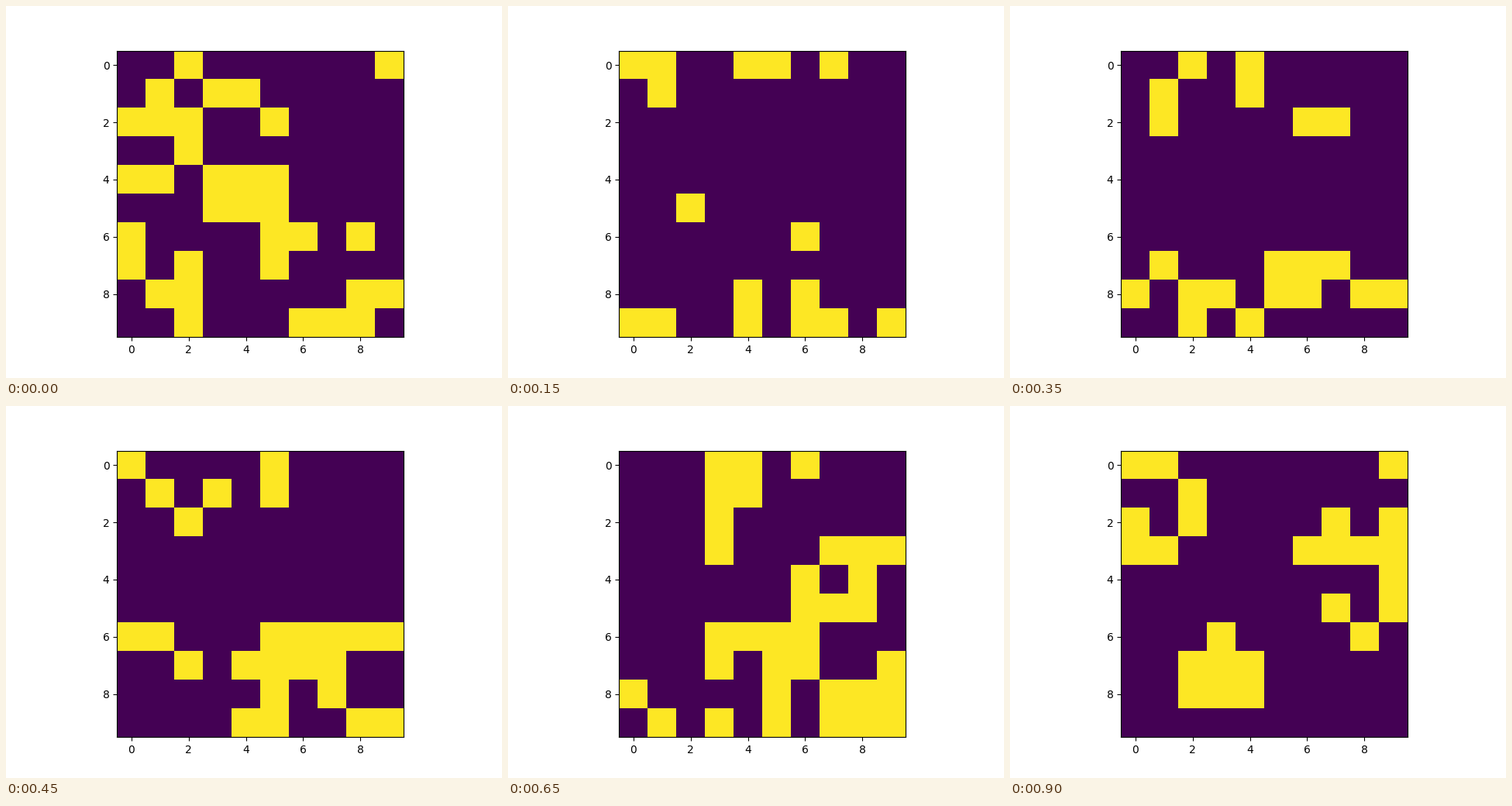
Write a matplotlib script that moves like this. It is 640x480 px and loops after 950 ms.

```python
import numpy as np
import matplotlib.pyplot as plt
from matplotlib.animation import FuncAnimation

FRAMES = 19
INTERVAL = 50

SEED = """
..#......#
.#.##.....
###..#....
..#.......
##.###....
...###....
#....##.#.
#.#..#....
.##.....##
..#...###.
"""


def parse(text):
    return np.array([[int(ch == "#") for ch in row] for row in text.split()])


def step(grid):
    """One generation of Conway's Game of Life on a torus."""
    around = sum(
        np.roll(grid, (dy, dx), axis=(0, 1))
        for dy in (-1, 0, 1)
        for dx in (-1, 0, 1)
        if (dy, dx) != (0, 0)
    )
    return ((around == 3) | ((grid == 1) & (around == 2))).astype(int)


generations = [parse(SEED)]
while len(generations) < FRAMES:
    generations.append(step(generations[-1]))

fig, ax = plt.subplots(figsize=(6.4, 4.8), dpi=100)
image = ax.imshow(generations[0], cmap="viridis", vmin=0, vmax=1,
                  interpolation="nearest")


def update(i):
    image.set_data(generations[i])
    return (image,)


anim = FuncAnimation(fig, update, frames=FRAMES, interval=INTERVAL,
                     repeat=True, repeat_delay=0)
plt.show()
```
